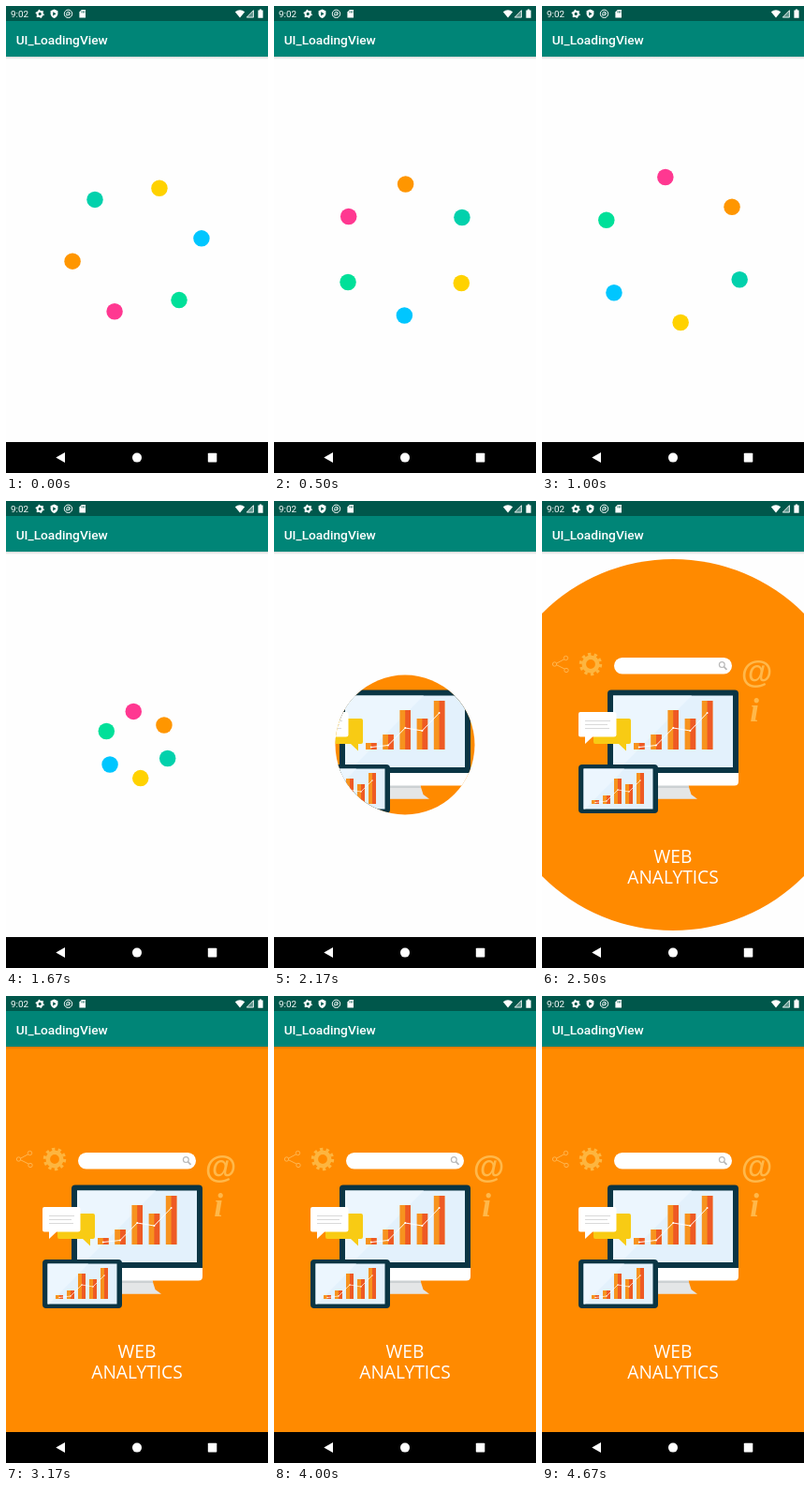
Recreate the animation shown at these times as an HTML page. Size 280 by 498 pixels, loop 4.99 s.

```html
<!DOCTYPE html>
<html lang="en">
<head>
<meta charset="utf-8">
<title>Loading view</title>
<style>
  html, body { margin: 0; width: 100%; height: 100%; overflow: hidden; background: #fff; }
  svg { display: block; width: 280px; height: 498px; }
  .ui { font-family: Roboto, sans-serif; font-weight: 500; fill: #fff; }
  .caption { font: 19.2px "Open Sans", sans-serif; fill: #fff; text-anchor: middle; }
</style>
</head>
<body>
<svg viewBox="0 0 280 498">
  <defs>
    <clipPath id="hole"><circle id="reveal" cx="140" cy="260" r="0"/></clipPath>
    <linearGradient id="shade" x1="0" y1="0" x2="0" y2="1">
      <stop offset="0" stop-color="#000" stop-opacity=".16"/>
      <stop offset="1" stop-color="#000" stop-opacity="0"/>
    </linearGradient>
  </defs>
  <rect width="280" height="498" fill="#fefefe"/>
  <g id="dots"></g>

  <g id="art" clip-path="url(#hole)">
    <rect y="54" width="280" height="412" fill="#ff8a00"/>

    <!-- icons around the screen -->
    <g stroke="#ffb650" fill="none" stroke-width="1">
      <path d="M25 168 14 174 26 180"/>
      <g fill="#ff8a00">
        <circle cx="13.5" cy="174" r="2.2"/>
        <circle cx="25.5" cy="167.5" r="2.2"/>
        <circle cx="26" cy="180.5" r="2.2"/>
      </g>
    </g>
    <g fill="none" stroke="#fdb53f">
      <circle cx="52" cy="174" r="7.2" stroke-width="4.6"/>
      <circle id="teeth" cx="52" cy="174" r="10.6" stroke-width="3.2"/>
    </g>
    <rect x="77" y="167" width="126" height="17.5" rx="8.75" fill="#fff"/>
    <g fill="none" stroke="#b9b9b9">
      <circle cx="192.3" cy="174.6" r="2.9" stroke-width="1.2"/>
      <path d="M194.5 176.8 197.5 179.8" stroke-width="1.7"/>
    </g>
    <g fill="#ffb84a" text-anchor="middle">
      <text x="229.5" y="194" font-family="'Liberation Sans', Arial, sans-serif" font-weight="700" font-size="34.5">@</text>
      <text x="227" y="235" font-family="'Liberation Serif', serif" font-weight="700" font-style="italic" font-size="35">i</text>
    </g>

    <!-- monitor -->
    <path d="M115 302H156L159.5 313 166 317.8H115Z" fill="#e4e6e7"/>
    <path d="M115 302H156L157.2 306H115Z" fill="#ccd1d3"/>
    <path d="M70 289H210V299Q210 303.5 205.5 303.5H70Z" fill="#fff"/>
    <path d="M70 290V205.5Q70 201.5 74 201.5H206Q210 201.5 210 205.5V290Z" fill="#0a3544"/>
    <rect x="76" y="207.5" width="128" height="76.5" fill="#e3f1fc"/>
    <path d="M76 207.5H160L84 284H76Z" fill="#ecf6fe"/>
    <g id="chart"></g>

    <!-- tablet -->
    <rect x="39" y="281" width="85" height="52" rx="4" fill="#0a3544"/>
    <rect x="44.5" y="285.5" width="74" height="43" fill="#e3f1fc"/>
    <path d="M44.5 285.5H88L46 328.5H44.5Z" fill="#ecf6fe"/>
    <g id="mini"></g>

    <!-- speech bubbles -->
    <path d="M57 232H93Q95 232 95 234V257Q95 259 93 259H90V266.5L82 259H57Q55 259 55 257V234Q55 232 57 232Z" fill="#f8cb14"/>
    <path d="M41 225H77Q79.5 225 79.5 227V249.5Q79.5 251.5 77 251.5H54L46 259V251.5H41Q39 251.5 39 249.5V227Q39 225 41 225Z" fill="#fff"/>
    <path d="M46 234.5H73M46 238.5H70M46 242.5H72" stroke="#d9d9d9" stroke-width="1"/>

    <text class="caption" x="140" y="386">WEB</text>
    <text class="caption" x="140" y="408">ANALYTICS</text>
  </g>

  <!-- system and app bars -->
  <rect y="54" width="280" height="3" fill="url(#shade)"/>
  <rect width="280" height="54" fill="#008577"/>
  <rect width="280" height="16" fill="#00574b"/>
  <text class="ui" x="5" y="12" font-size="9.9" style="font-weight:400">9:02</text>
  <text class="ui" x="10.7" y="40.8" font-size="13.7">UI_LoadingView</text>
  <g fill="none" stroke="#fff">
    <circle cx="36.2" cy="8.4" r="2.6" stroke-width="2"/>
    <circle cx="36.2" cy="8.4" r="4" stroke-width="1.3" stroke-dasharray="1.6 2.59"/>
    <circle cx="66.5" cy="8.3" r="4.2" stroke-width="1"/>
    <path d="M64.8 10.3V7.8A1.8 1.8 0 1 1 66.6 9.8H64.8M66.3 8H68" stroke-width=".9"/>
  </g>
  <g fill="#fff">
    <path d="M51.5 3.6 55.4 5.2V8.2Q55.2 11.5 51.5 13Q47.8 11.5 47.6 8.2V5.2Z"/>
    <path d="M50.2 6.2 53.6 8.3 50.2 10.4Z" fill="#00574b"/>
    <path d="M80.8 4H85V12.6H78.4V6.4Z"/>
    <path d="M80.9 5.4V7.4M82.4 5.4V7.4M83.8 5.4V7.4" stroke="#00574b" stroke-width=".7"/>
    <path d="M244.8 6.2Q250 2.4 255.2 6.2L250 12.6Z"/>
    <path d="M265 3.8V12.5H256.5Z" fill-opacity=".35"/>
    <path d="M264.4 4.8V12H257.4Z" fill="none" stroke="#fff" stroke-width=".8"/>
    <path d="M270.9 3.5H273.1V4.4H274.6V12.8H269.4V4.4H270.9Z"/>
  </g>
  <rect y="465" width="280" height="33" fill="#000"/>
  <g fill="#fff">
    <path d="M53.3 481.6 63 476.1V487.1Z"/>
    <circle cx="140" cy="481.6" r="5"/>
    <rect x="215.8" y="476.8" width="9.5" height="9.8" rx=".8"/>
  </g>
</svg>
<script>
const $ = id => document.getElementById(id);
const LOOP = 4990, FPS = 6;
const CX = 140, CY = 260, RING = 70;
const MERGE = 766, EXPAND = 1798, PHASE = 1000;
const FULL = Math.hypot(280, 411) / 2;
const COLORS = ['#ff9600', '#02d1ac', '#ffd200', '#00c6ff', '#00e099', '#ff3891'];

function add(parent, tag, attrs) {
  const el = document.createElementNS(parent.namespaceURI, tag);
  for (const k in attrs) el.setAttribute(k, attrs[k]);
  return parent.appendChild(el);
}

// Two-tone bars with a trend line across them.
function drawChart(g, x, base, step, w, heights, trend) {
  heights.forEach((h, i) => {
    const left = x + i * step;
    add(g, 'rect', { x: left, y: base - h, width: w, height: h, fill: '#f7931e' });
    add(g, 'rect', { x: left + w / 2, y: base - h, width: w / 2, height: h, fill: '#ee5a24' });
  });
  const pts = trend.map((h, i) => [x + w / 2 + i * step, base - h]);
  add(g, 'polyline', { points: pts.join(' '), fill: 'none', stroke: '#fff', 'stroke-width': w / 12 });
  for (const [cx, cy] of pts) add(g, 'circle', { cx, cy, r: w / 12, fill: '#fff' });
}

drawChart($('chart'), 98, 265, 18.2, 11.6, [7, 16, 42, 33, 52], [2.5, 4.5, 23, 20, 39]);
drawChart($('mini'), 53, 323, 12, 8, [4, 9, 27, 21, 33], [1.5, 3, 15, 13, 25]);

const tooth = 2 * Math.PI * 10.6 / 20;
$('teeth').setAttribute('stroke-dasharray', `${tooth} ${tooth}`);

const dots = COLORS.map(fill => add($('dots'), 'circle', { r: RING / 8, fill }));
const clamp = v => Math.min(1, Math.max(0, v));
const anticipate = p => p * p * (4 * p - 3);
const easeInOut = p => (1 - Math.cos(Math.PI * p)) / 2;

function draw(t) {
  const turn = 170 + 154 * clamp(t / MERGE);
  const ring = RING * (1 - anticipate(clamp((t - MERGE) / PHASE)));
  dots.forEach((dot, i) => {
    const a = (turn + i * 60) * Math.PI / 180;
    dot.setAttribute('cx', CX + ring * Math.cos(a));
    dot.setAttribute('cy', CY + ring * Math.sin(a));
  });
  const grow = clamp((t - EXPAND) / PHASE);
  $('dots').style.display = t < MERGE + PHASE ? '' : 'none';
  $('art').style.display = grow > 0 ? '' : 'none';
  $('reveal').setAttribute('r', grow < 1 ? FULL * easeInOut(grow) : 400);
}

const hold = t => Math.floor((t + 4) * FPS / 1000) * 1000 / FPS;

const start = performance.now();
function tick() {
  draw(hold((performance.now() - start) % LOOP));
  requestAnimationFrame(tick);
}
tick();
</script>
</body>
</html>
```
